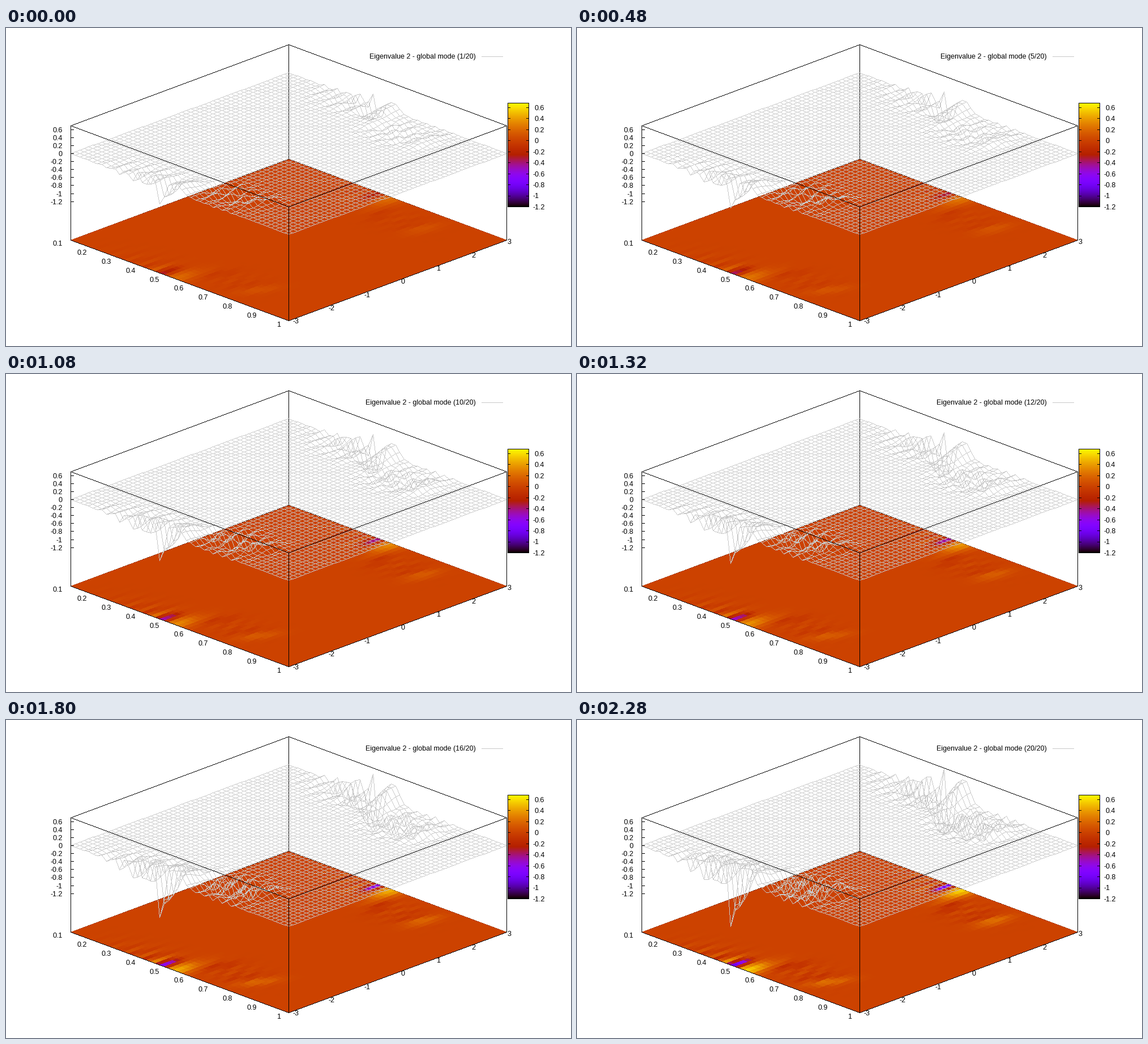
Animation, 998 px wide and 561 px high, one loop 2.4 s. Source, as a matplotlib script:

```python
import numpy as np
import matplotlib.pyplot as plt
from matplotlib.animation import FuncAnimation
from matplotlib.collections import PolyCollection

W, H, DPI = 998, 561, 64
PX = 72 / DPI
N, STEPS = 50, 20
ZMIN, ZMAX = -1.2, 0.683
L, C, R = 114, 499, 884
DX, DY = 385 / (N - 1), 142.5 / (N - 1)
ZERO, FLOOR, ZPX = 221, 373.7, 70.6
GRAY, BLACK = (200, 200, 200, 255), (0, 0, 0, 255)

plt.rcParams["font.family"] = "Liberation Sans"
plt.rcParams["font.size"] = 12.5 * PX

fig = plt.figure(figsize=(W / DPI, H / DPI), dpi=DPI, facecolor="white")
ax = fig.add_axes([0, 0, 1, 1])
ax.axis("off")


def palette(z):
    g = np.clip((z - ZMIN) / (ZMAX - ZMIN), 0, 1)
    blue = np.clip(np.sin(2 * np.pi * g), 0, 1)
    return np.stack([np.sqrt(g), g ** 3, blue], axis=-1)


def bell(v, center, width):
    return np.exp(-((v - center) / width) ** 2)


def mode_shape():
    """Full-size mode on the grid: i runs along x, j along y."""
    i, j = np.meshgrid(np.arange(N), np.arange(N), indexing="ij")
    d = np.minimum(j, N - 1 - j)
    near = j < N / 2

    # short waves growing towards the core
    phase = np.where(near, 2.6 - 0.35 * d, 0.35 * d)
    z = 0.48 * bell(i, 19, 8.5) * bell(d, 0, 4.5) * (i <= 18)
    z = z * np.cos(2 * np.pi * (i - 19) / 2.75 + phase)

    # core: spike, trough and hill
    z += (i == 19) * 0.3 * bell(d, 0, 5)
    z -= ((i == 20) * 0.85 + (i == 21) * 0.62) * np.exp(-(d / 3.8) ** 4)
    z += 0.62 * bell(i, 23.5 + 0.1 * d, 1.9) * bell(d, 0, 5) * (i > 21)
    z[20, 0], z[19, -1] = -1.2, 0.68

    # wake behind the core
    z -= 0.2 * bell(i, 26.5 + 0.3 * (d - 5), 1) * bell(d, 6, 3.5)
    z += (0.26 * bell(i, 31, 5.5) * bell(d, 6, 4) * (i > 23)
          * np.cos(2 * np.pi * i / 2.5 + 0.9 * d))
    z += 0.07 * bell(i, 32, 5) * bell(d, 0, 3) * np.where(i % 2, 1, -1) * (i > 26)

    # second, weaker streak
    ridge = np.where(near, 34 + 0.38 * d, 37 - 0.12 * d)
    z += 0.28 * bell(i, ridge, 1.3) * bell(d, 6, 3.5)
    z -= 0.1 * bell(i, ridge - 2.8, 1.2) * bell(d, 6, 3.5)
    return z


def project(height):
    i, j = np.meshgrid(np.arange(N), np.arange(N), indexing="ij")
    return np.stack([L + DX * (i + j), height + DY * (i - j)], axis=-1)


def stroke(canvas, a, b, color):
    """Crisp one-pixel segments from points a to points b."""
    a, b = np.rint(a), np.rint(b)
    n = np.maximum(np.abs(b - a).max(axis=1), 1)
    t = np.minimum(np.arange(n.max() + 1) / n[:, None], 1)[..., None]
    p = np.floor(a[:, None] + t * (b - a)[:, None] + 0.5).astype(int)
    canvas[p[..., 1], p[..., 0]] = color


def path(canvas, *pts, color=BLACK):
    p = np.array(pts, float)
    stroke(canvas, p[:-1], p[1:], color)


def blank():
    return np.zeros((H, W, 4), np.uint8)


def show(canvas, z):
    return ax.imshow(canvas, extent=(0, W, H, 0), interpolation="nearest",
                     aspect="auto", zorder=z)


def label(x, y, s, ha="left"):
    return ax.text(x, y + 4.4, s, ha=ha, va="baseline", zorder=6)


SHAPE = mode_shape()
FLAT = project(ZERO)

# box: edges behind and in front of the surface
back, front = blank(), blank()
path(back, (L, 374), (C, 231), (R, 374))
path(back, (C, 29), (C, 231))
path(back, (L, 172), (C, 29), (R, 172))
path(front, (L, 374), (C, 516), (R, 374))
path(front, (L, 172), (C, 315), (R, 172))
for x, top, bottom in ((L, 172, 374), (C, 315, 516), (R, 172, 374)):
    path(front, (x, top), (x, bottom))

# axis labels
for n in range(10):
    z = round(0.6 - 0.2 * n, 1) + 0.0
    y = ZERO - z * ZPX
    path(front, (L, y), (L + 5, y))
    label(100, y + 0.5, f"{z:g}", "right")
    label(100 + 42.8 * n, 380 + 15.8 * n, f"{0.1 + 0.1 * n:g}", "right")
for n in range(-3, 4):
    label(700.7 + 62.8 * n, 447 - 23.35 * n, str(n), "center")

# colour bar
ramp = palette(np.linspace(ZMAX, ZMIN, 256))[:, None]
ax.imshow(ramp, extent=(886, 924, 315, 132), aspect="auto", zorder=2)
path(front, (886, 132), (923, 132), (923, 315), (886, 315), (886, 132))
for n in range(10):
    z = round(0.6 - 0.2 * n, 1) + 0.0
    y = 140 + 19.44 * n
    path(front, (886, y), (890, y))
    path(front, (919, y), (923, y))
    label(930.5 if z < 0 else 933.5, y + 0.5, f"{z:g}")

# legend
title = label(829.5, 49.5, "", "right")
path(front, (840, 50), (877, 50), color=GRAY)

# floor map and wire surface
ground = project(FLOOR) + 0.5
quads = np.stack([ground[:-1, :-1], ground[1:, :-1], ground[1:, 1:], ground[:-1, 1:]],
                 axis=2).reshape(-1, 4, 2)
base, = ax.fill(*ground[[0, -1, -1, 0], [0, 0, -1, -1]].T,
                color=palette(np.array(0.0)), lw=0, zorder=2)
tiles = PolyCollection(quads, edgecolors="none", linewidths=0,
                       antialiaseds=False, zorder=3)
ax.add_collection(tiles, autolim=False)
tiles.set_clip_path(base)
show(back, 1)
mesh = show(blank(), 4)
show(front, 5)
ax.set_xlim(0, W)
ax.set_ylim(H, 0)


def draw(k):
    z = SHAPE * np.exp(-0.0537 * (STEPS - 1 - k))
    pts = FLAT.copy()
    pts[..., 1] -= ZPX * z
    wires = blank()
    for p in (pts, pts.transpose(1, 0, 2)):
        stroke(wires, p[:-1].reshape(-1, 2), p[1:].reshape(-1, 2), GRAY)
    mesh.set_data(wires)
    mean = (z[:-1, :-1] + z[1:, :-1] + z[1:, 1:] + z[:-1, 1:]) / 4
    tiles.set_facecolor(palette(mean.ravel()))
    title.set_text(f"Eigenvalue 2 - global mode ({k + 1}/{STEPS})")
    return mesh, tiles, title


anim = FuncAnimation(fig, draw, frames=STEPS, interval=120, repeat=True, blit=False)
plt.show()
```
